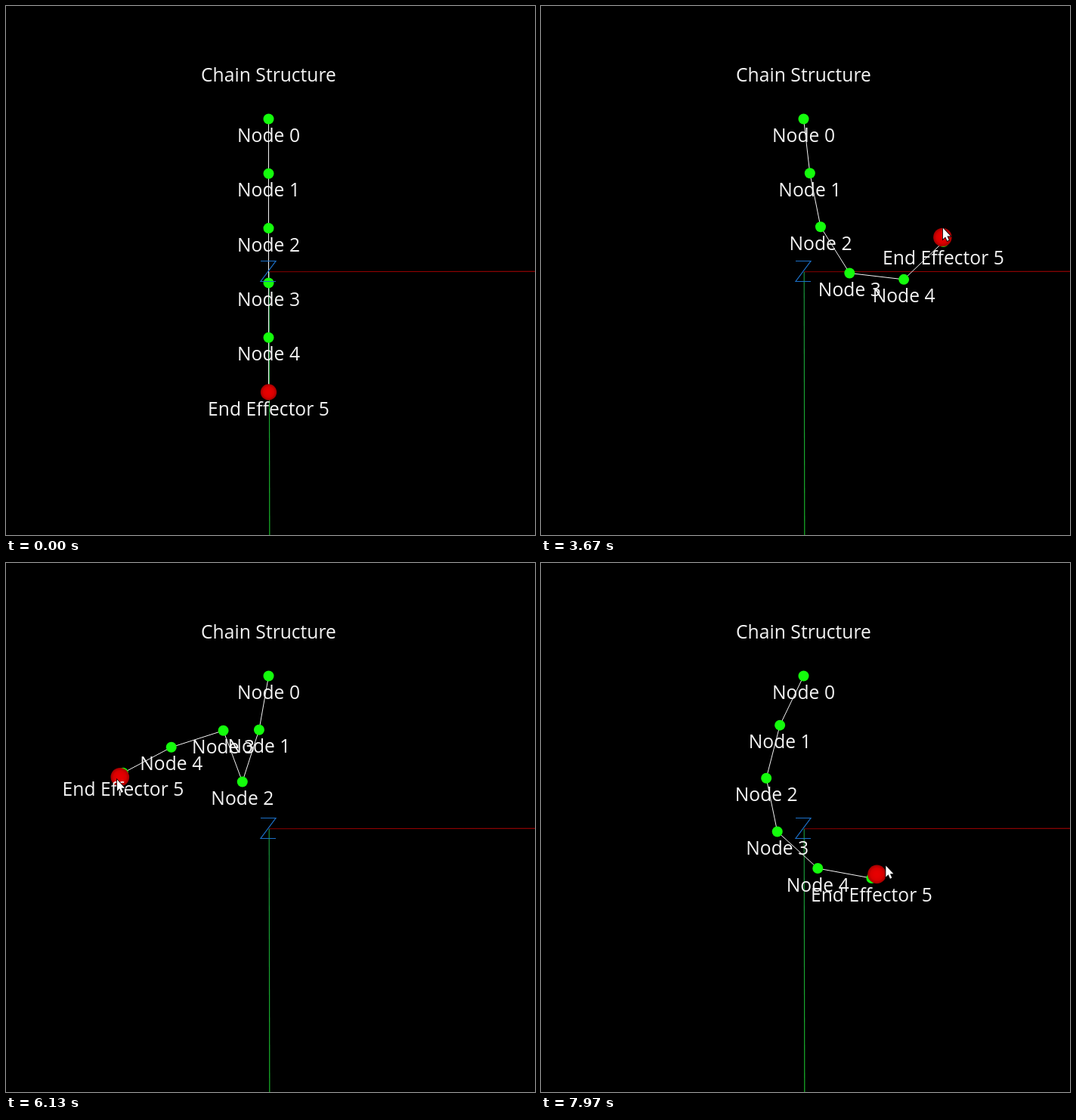
An HTML page with a canvas for the animation above (8000 ms loop, 700 px wide and 700 px high).

```html
<!DOCTYPE html>
<html lang="en">
<head>
<meta charset="utf-8">
<title>Chain Structure</title>
<style>
  html, body { margin: 0; height: 100%; overflow: hidden; background: #000; }
  canvas { display: block; width: 100vw; height: 100vh; }
</style>
</head>
<body>
<canvas id="stage" width="700" height="700"></canvas>
<script>
const ctx = document.getElementById('stage').getContext('2d');
const LOOP = 8000, LINK = 72.3, ROOT = [347.5, 149.5];
const GRAB = 1800, ARRIVE = 1200;
const LAG = 35;             // ms by which the chain trails its handle
const REST = [2, -4];       // pointer tip relative to the handle at rest
const INK = '#f4f4f4';

// Key poses: link angles in degrees from straight down, root first
const POSES = [
  { at: GRAB, angles: [0, 0, 0, 0, 0] },
  { at: 3670, angles: [6.6, 11.3, 32, 83.3, 133.6] },
  { at: 5070, angles: [10, -2.8, 97.2, 230.6, 263.7] },
  { at: 6130, angles: [-10, -17.8, 200.3, 287.7, 298] },
  { at: 6900, angles: [-19.3, -47.4, 288.2, 330, 380] },
  { at: 7970, angles: [-25.7, -14.4, 371.6, 407.8, 439.6] }
];

function slope(k, link) {
  const a = POSES[k], b = POSES[k + 1];
  return (b.angles[link] - a.angles[link]) / (b.at - a.at);
}

// Starts from rest, never overshoots a key pose, ends at full speed
function tangent(k, link) {
  if (k === 0) return 0;
  const before = slope(k - 1, link);
  if (k === POSES.length - 1) return before;
  const after = slope(k, link);
  return before * after <= 0 ? 0 : 2 * before * after / (before + after);
}

function linkAngles(t) {
  const time = Math.min(Math.max(t, GRAB), POSES[POSES.length - 1].at);
  const k = Math.max(0, POSES.findIndex(pose => pose.at >= time) - 1);
  const from = POSES[k], to = POSES[k + 1];
  const span = to.at - from.at, u = (time - from.at) / span, v = 1 - u;
  return from.angles.map((a, i) =>
    a + (to.angles[i] - a) * u * u * (3 - 2 * u) +
    span * u * v * (v * tangent(k, i) - u * tangent(k + 1, i)));
}

function chainAt(t) {
  const joints = [ROOT];
  linkAngles(t).forEach((degrees, i) => {
    const a = degrees * Math.PI / 180, [x, y] = joints[i];
    joints.push([x + LINK * Math.sin(a), y + LINK * Math.cos(a)]);
  });
  return joints;
}

// How far the end of the chain travels during one lag
function leadAt(t) {
  const time = Math.min(t, POSES[POSES.length - 1].at), step = 5;
  const a = chainAt(time - step)[5], b = chainAt(time)[5];
  return [0, 1].map(n => (b[n] - a[n]) / step * LAG);
}

function pointerAt(t, end, lead) {
  const left = 1 - Math.min(t / ARRIVE, 1), away = left * left;
  return [
    end[0] + REST[0] + 2.4 * lead[0] + 360 * away,
    end[1] + REST[1] + 2.4 * lead[1] + 210 * away
  ];
}

function line(points, color, width = 1) {
  ctx.strokeStyle = color;
  ctx.lineWidth = width;
  ctx.beginPath();
  points.forEach(([x, y]) => ctx.lineTo(x, y));
  ctx.stroke();
}

function disc([x, y], r, fill) {
  ctx.fillStyle = fill;
  ctx.beginPath();
  ctx.arc(x, y, r, 0, 2 * Math.PI);
  ctx.fill();
}

function blend(gradient, ...colors) {
  colors.forEach((color, i) => gradient.addColorStop(i / (colors.length - 1), color));
  return gradient;
}

function drawAxes() {
  const red = blend(ctx.createLinearGradient(348, 0, 700, 0), '#840000', '#b40404');
  const green = blend(ctx.createLinearGradient(0, 352, 0, 700), '#18903c', '#18b428');
  line([[348, 351.7], [700, 351.2]], red);
  line([[348.2, 352], [348.8, 700]], green, 1.2);
}

function drawHandle([x, y], r) {
  disc([x, y], r, blend(ctx.createRadialGradient(x, y, 0, x, y, r),
    '#e80000', '#e40000', '#d80000', '#a00000'));
}

function drawLabels(joints) {
  ctx.font = '24.6px "Open Sans", "Noto Sans", sans-serif';
  ctx.textAlign = 'center';
  ctx.letterSpacing = '0.05px';
  ctx.fillStyle = INK;
  ctx.fillText('Chain Structure', 347.5, 100);
  joints.forEach(([x, y], i) =>
    ctx.fillText((i < 5 ? 'Node ' : 'End Effector ') + i, x, y + 30.5));
}

function drawPointer([x, y]) {
  const arrow = new Path2D('M0 0V16.5L3.8 13L6.6 19L9.3 17.8L6.6 12H11.8Z');
  ctx.save();
  ctx.translate(x, y);
  ctx.scale(0.85, 0.9);
  ctx.lineWidth = 2;
  ctx.strokeStyle = '#000';
  ctx.stroke(arrow);
  ctx.fillStyle = '#fff';
  ctx.fill(arrow);
  ctx.restore();
}

function draw(t) {
  const joints = chainAt(t), end = joints[5], lead = leadAt(t);
  const handle = [end[0] + lead[0], end[1] + lead[1]];
  const pointer = pointerAt(t, end, lead);
  const held = t > GRAB || Math.hypot(pointer[0] - end[0], pointer[1] - end[1]) < 12;

  ctx.fillStyle = '#000';
  ctx.fillRect(0, 0, 700, 700);
  drawAxes();
  line(joints, INK);
  joints.forEach(joint => disc(joint, 7, '#14fc0c'));
  line([[337, 337.5], [357, 337.5], [337, 364.5], [357, 364.5]], '#1c70c8', 1.2);
  drawHandle(handle, held ? 12.3 : 10.7);
  drawLabels(joints);
  drawPointer(pointer);
}

function tick() {
  draw(performance.now() % LOOP);
  requestAnimationFrame(tick);
}
tick();
</script>
</body>
</html>
```
